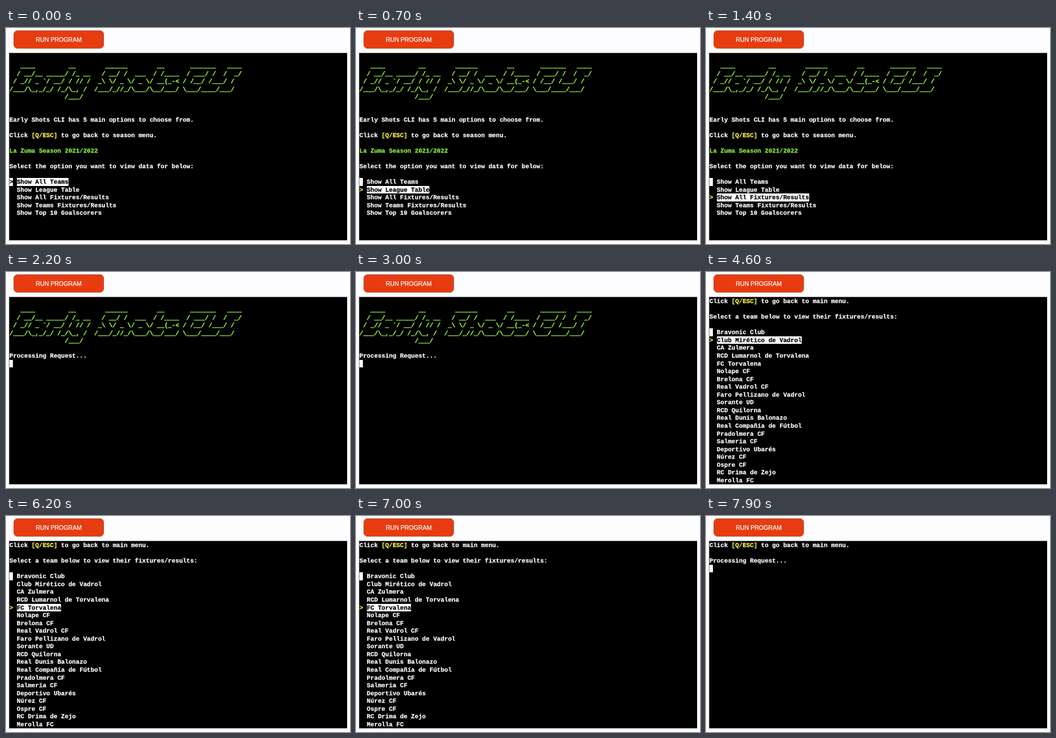
These frames come from a looping animation (600x376 px, 8 s). An HTML page:

```html
<!DOCTYPE html>
<html lang="en">
<head>
<meta charset="utf-8">
<title>Terminal menu</title>
<style>
  html, body { margin: 0; width: 100%; height: 100%; overflow: hidden; background: #fdfcff; }
  #run {
    position: absolute; left: 13px; top: 4px; width: 158px; height: 32px; box-sizing: border-box;
    border: 1px solid #b0705c; border-radius: 7px; background: #e63c10; color: #fff;
    font: 10.5px/30px "Liberation Sans", Arial, sans-serif; text-align: center;
    -webkit-text-stroke: .25px;
  }
  #terminal {
    position: absolute; left: 5px; top: 43px; width: 589px; height: 325px;
    border: 1px solid #777; border-right: 0; background: #000; overflow: hidden;
  }
  /* The line box is taller than its row so that glyphs sit low in their cells. */
  #screen {
    color: #fff; font: bold 10.72px/16.5px "Liberation Mono", "Courier New", monospace;
    text-rendering: geometricPrecision; font-variant-ligatures: none; -webkit-text-stroke: .25px;
  }
  #screen div { height: 13.57px; white-space: pre; }
  #screen span { display: inline-block; height: 13.57px; vertical-align: top; }
  .green { color: #90ee40; }
  .yellow { color: #fcf050; }
  #screen .banner { position: relative; top: 1.5px; color: #90ee40; -webkit-text-stroke: .5px; }
  .inverse { background: #fff; color: #000; }
  #scrollbar { position: absolute; right: 1px; top: 13px; width: 5px; height: 311px; border-radius: 3px; background: #444; }
</style>
</head>
<body>
<div id="run">RUN PROGRAM</div>
<div id="terminal"><div id="screen"></div><div id="scrollbar"></div></div>

<script type="text/plain" id="banner">
   ____         __        ______        __       _______   ____
  / __/__ _____/ /_ __   / __/ /  ___  / /____  / ___/ /  /  _/
 / _// _ `/ __/ / // /  _\ \/ _ \/ _ \/ __(_-< / /__/ /___/ /
/___/\_,_/_/ /_/\_, /  /___/_//_/\___/\__/___/ \___/____/___/
               /___/
</script>
<script>
const DURATION = 8000;
const $ = id => document.getElementById(id);
const escapeText = s => s.replace(/&/g, '&amp;').replace(/</g, '&lt;').replace(/>/g, '&gt;');
const paint = (style, s) => `<span class="${style}">${escapeText(s)}</span>`;

const banner = ['', ...$('banner').textContent.slice(1).trimEnd().split('\n').map(s => paint('banner', s))];
const options = ['Show All Teams', 'Show League Table', 'Show All Fixtures/Results',
  'Show Teams Fixtures/Results', 'Show Top 10 Goalscorers'];
const teams = ['Bravonic Club', 'Club Mirético de Vadrol', 'CA Zulmera', 'RCD Lumarnol de Torvalena',
  'FC Torvalena', 'Nolape CF', 'Brelona CF', 'Real Vadrol CF', 'Faro Pellizano de Vadrol', 'Sorante UD',
  'RCD Quilorna', 'Real Dunis Balonazo', 'Real Compañía de Fútbol', 'Pradolmera CF', 'Salmeria CF',
  'Deportivo Ubarés', 'Núrez CF', 'Ospre CF', 'RC Drima de Zejo', 'Merolla FC'];

const backHint = menu => `Click ${paint('yellow', '[Q/ESC]')} to go back to ${menu} menu.`;
const processing = ['Processing Request...', paint('inverse', ' ')];

// The terminal cursor always rests on the first entry's marker cell.
const list = (items, selected) => items.map((item, i) => {
  const active = i === selected;
  const marker = paint(i === 0 ? 'inverse' : 'yellow', active ? '>' : ' ');
  return `${marker} ${active ? paint('inverse', item) : escapeText(item)}`;
});

const mainMenu = selected => [
  ...banner, '', '',
  'Early Shots CLI has 5 main options to choose from.', '',
  backHint('season'), '',
  paint('green', 'La Zuma Season 2021/2022'), '',
  'Select the option you want to view data for below:', '',
  ...list(options, selected)
];
const teamMenu = selected => [
  backHint('main'), '',
  'Select a team below to view their fixtures/results:', '',
  ...list(teams, selected)
];

const timeline = [
  [0, mainMenu(0)], [700, mainMenu(1)], [1200, mainMenu(2)], [1600, mainMenu(3)],
  [2000, [...banner, '', ...processing]],
  [3200, teamMenu(0)], [4300, teamMenu(1)], [4700, teamMenu(2)], [4900, teamMenu(3)], [5100, teamMenu(4)],
  [7300, [backHint('main'), '', ...processing]]
].map(([start, lines]) => ({ start, html: lines.map(line => `<div>${line}</div>`).join('') }));

let shown;
function draw() {
  const time = performance.now() % DURATION;
  const step = timeline.findLast(({ start }) => start <= time);
  if (step !== shown) {
    $('screen').innerHTML = step.html;
    shown = step;
  }
  const fade = Math.min(1, Math.max(0, (4000 - time) / 250));
  $('scrollbar').style.opacity = time < 3200 ? 0 : fade;
  requestAnimationFrame(draw);
}
draw();
</script>
</body>
</html>
```
